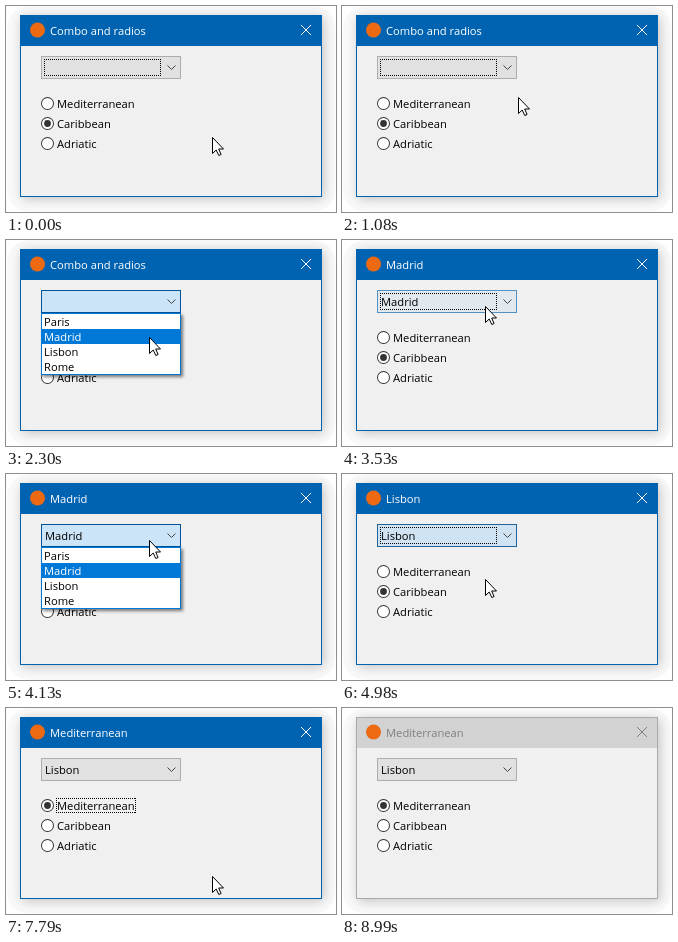
An HTML page with a canvas that plays this animation: 330x206 px, repeating every 9090 ms.

```html
<!DOCTYPE html>
<html lang="en">
<head>
<meta charset="utf-8">
<title>Combo and radios</title>
<style>
html, body { margin: 0; width: 330px; height: 206px; overflow: hidden; background: #fff; }
canvas { display: block; }
</style>
</head>
<body>
<canvas id="stage" width="330" height="206"></canvas>
<script>
const g = document.getElementById('stage').getContext('2d');
const LOOP = 9090, STEP = 144;
const CITIES = ['Paris', 'Madrid', 'Lisbon', 'Rome'];
const SEAS = ['Mediterranean', 'Caribbean', 'Adriatic'];
const BLUE = '#0078d7', DARK_BLUE = '#005499', PALE = '#cce4f7';

// Each entry changes part of the window's state from its time on.
const script = [
  { at: -LOOP, title: 'Combo and radios', city: '', sea: 'Caribbean', focus: 'combo', combo: 'idle' },
  { at: 1330, combo: 'hot' },
  { at: 1620, combo: 'open' },
  { at: 2830, combo: 'idle', city: 'Madrid', title: 'Madrid' },
  { at: 3390, combo: 'hot' },
  { at: 3980, combo: 'open' },
  { at: 4980, combo: 'idle', city: 'Lisbon', title: 'Lisbon' },
  { at: 6050, pressed: 'Adriatic', focus: 'Adriatic' },
  { at: 6170, pressed: '', sea: 'Adriatic', title: 'Adriatic' },
  { at: 7160, pressed: 'Mediterranean', focus: 'Mediterranean' },
  { at: 7290, pressed: '', sea: 'Mediterranean', title: 'Mediterranean' },
  { at: 8990, inactive: true, focus: '' }
];

// Pointer moves: start and end time, where to.
const START = [206, 131];
const moves = [
  { from: 560, until: 1480, to: [157, 65] },
  { from: 1870, until: 2300, to: [143, 97] },
  { from: 2970, until: 3530, to: [143, 66] },
  { from: 4250, until: 4700, to: [143, 105] },
  { from: 5100, until: 5900, to: [80, 139] },
  { from: 6710, until: 7010, to: [80, 99] },
  { from: 7300, until: 8180, to: [288, 212] }
];

const clamp = k => Math.min(1, Math.max(0, k));

function stateAt(t) {
  const state = {};
  for (const entry of script.filter(e => e.at <= t)) {
    Object.assign(state, entry);
    if (entry.combo) state.comboAt = entry.at;
  }
  return state;
}

// The pointer advances in even ticks along an eased path.
function pointerAt(t) {
  let pos = START;
  for (const { from, until, to } of moves) {
    if (t < from) break;
    const n = Math.round((until - from) / STEP);
    const k = clamp((Math.floor((t - from) / (until - from) * n + 1e-6) + 1) / (n + 1));
    const ease = k * k * (3 - 2 * k);
    pos = pos.map((p, i) => Math.round(p + (to[i] - p) * ease));
  }
  return pos;
}

function rect(x, y, w, h, fill) {
  g.fillStyle = fill;
  g.fillRect(x, y, w, h);
}

function box(x, y, w, h, fill, edge) {
  rect(x + 1, y + 1, w - 2, h - 2, fill);
  g.strokeStyle = edge;
  g.lineWidth = 1;
  g.strokeRect(x + .5, y + .5, w - 1, h - 1);
}

function text(s, x, y, color = '#000') {
  g.fillStyle = color;
  g.fillText(s, x, y);
}

function line(points, color) {
  g.strokeStyle = color;
  g.lineWidth = 1;
  g.beginPath();
  points.forEach(p => g.lineTo(...p));
  g.stroke();
}

function disc(x, y, r, fill) {
  g.fillStyle = fill;
  g.beginPath();
  g.arc(x, y, r, 0, 7);
  g.fill();
}

function shadow(color, blur, offset, paint) {
  g.save();
  g.shadowColor = color;
  g.shadowBlur = blur;
  g.shadowOffsetX = g.shadowOffsetY = offset;
  paint();
  g.restore();
}

// Every second pixel along the border.
function focusRect(x, y, w, h) {
  for (let i = 0; i < w; i += 2) {
    rect(x + i, y, 1, 1, '#000');
    rect(x + i, y + h - 1, 1, 1, '#000');
  }
  for (let i = 0; i < h; i += 2) {
    rect(x, y + i, 1, 1, '#000');
    rect(x + w - 1, y + i, 1, 1, '#000');
  }
}

function drawWindow({ title, inactive }) {
  rect(0, 0, 330, 206, '#fff');
  g.fillStyle = '#f9f9f9';
  g.beginPath();
  g.roundRect(1, 0, 328, 206, 22);
  g.fill();

  const bar = inactive ? '#d2d2d2' : '#0063b1';
  const ink = inactive ? '#808080' : '#fff';
  shadow('rgba(0,0,0,.22)', 11, 2, () => rect(14, 9, 302, 182, bar));
  box(14, 9, 302, 182, '#f0f0f0', inactive ? '#aaa' : bar);
  rect(15, 10, 300, 30, bar);

  disc(31.5, 24, 7.5, '#ee6a12');
  text(title, 44, 29, ink);
  line([[295, 19], [305, 29]], ink);
  line([[305, 19], [295, 29]], ink);
}

function drawCombo({ city, combo, comboAt, focus }, t) {
  const fade = clamp((t - comboAt + 80) / 420);
  const layer = (fill, edge, alpha) => {
    g.globalAlpha = alpha;
    box(35, 50, 140, 23, fill, edge);
    g.globalAlpha = 1;
  };
  layer('#e1e1e1', '#adadad', 1);
  if (combo === 'hot') layer('#e5f1fb', BLUE, fade);
  else layer(PALE, DARK_BLUE, combo === 'open' ? 1 : 1 - fade);
  text(city, 39, 66);
  line([[161.5, 59.5], [165.5, 63.5], [169.5, 59.5]], '#444');
  if (focus === 'combo' && combo !== 'open') focusRect(38, 53, 117, 17);
}

function drawRadio(sea, i, state, [px, py]) {
  const y = 97.5 + 20 * i;
  const pressed = state.pressed === sea;
  const hover = state.combo !== 'open' && px > 34 && px < 131 && Math.abs(py - y) < 9;
  const ink = pressed ? DARK_BLUE : hover ? BLUE : '#333';
  disc(41.5, y, 6.5, ink);
  disc(41.5, y, 5.5, pressed ? PALE : '#fff');
  if (state.sea === sea) disc(41.5, y, 3.4, ink);
  text(sea, 51, y + 4.5);
  if (state.focus === sea)
    focusRect(50, y - 7.5, Math.round(g.measureText(sea).width) + 2, 15);
}

function drawList(city, py) {
  const row = Math.floor((py - 74) / 15);
  const picked = row < 0 ? city : CITIES[row];
  shadow('rgba(0,0,0,.5)', 3, 2, () => rect(35, 73, 140, 62, BLUE));
  box(35, 73, 140, 62, '#fff', BLUE);
  CITIES.forEach((name, i) => {
    const y = 74 + 15 * i;
    if (name === picked) rect(36, y, 138, 15, BLUE);
    text(name, 38, y + 12, name === picked ? '#fff' : '#000');
  });
}

function drawPointer([x, y]) {
  const arrow = new Path2D(`M${x + .5} ${y + .5}v16l3.7-3.5 2.6 5.5 2.3-1-2.4-5.5h4.8z`);
  g.fillStyle = '#fff';
  g.strokeStyle = '#000';
  g.lineWidth = 1;
  g.fill(arrow);
  g.stroke(arrow);
}

function draw(t) {
  const state = stateAt(t), pointer = pointerAt(t);
  g.font = '11.2px "Open Sans", "Noto Sans", sans-serif';
  drawWindow(state);
  drawCombo(state, t);
  SEAS.forEach((sea, i) => drawRadio(sea, i, state, pointer));
  if (state.combo === 'open') drawList(state.city, pointer[1]);
  drawPointer(pointer);
}

function loop(now) {
  draw(now % LOOP);
  requestAnimationFrame(loop);
}

draw(0);
requestAnimationFrame(loop);
</script>
</body>
</html>
```
